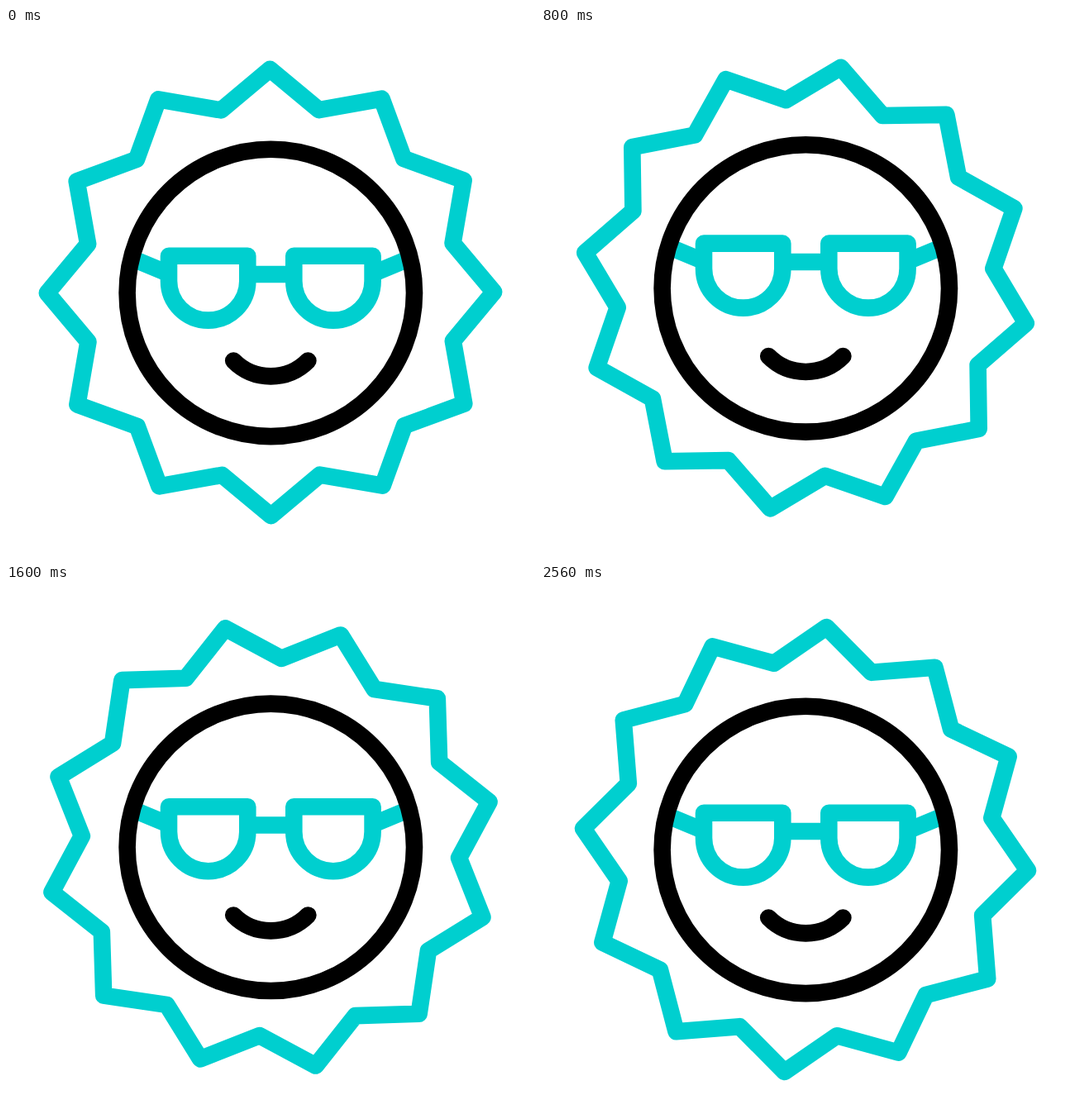
Write an HTML page that moves like this. It is 640x640 px and loops after 2.6 s.

```html
<!DOCTYPE html>
<html lang="en">
<head>
<meta charset="utf-8">
<title>Sun with sunglasses</title>
<style>
  html, body { margin: 0; width: 100%; height: 100%; overflow: hidden; background: #fff; }
  svg { display: block; width: 100%; height: 100%; }
  g { fill: none; stroke-width: 20.6; stroke-linejoin: round; }
  .teal { stroke: #00cfcf; }
  .black { stroke: #000; }
</style>
</head>
<body>
<svg viewBox="0 0 640 640">
  <g id="rays" class="teal"><polygon id="star"/></g>
  <g id="glasses" class="teal">
    <path d="M156 280.2L197 297.2M484.6 280.2L443.6 297.2M292.3 298H348.3"/>
    <path id="lens" d="M197 275.7H292.3V306a47.65 47.65 0 0 1 -95.3 0Z"/>
    <use href="#lens" x="151.3"/>
  </g>
  <g id="face" class="black">
    <circle cx="320.3" cy="320.4" r="173.7"/>
    <path d="M275.2 402.5a63.3 63.3 0 0 0 90.2 0" stroke-linecap="round"/>
  </g>
</svg>
<script>
const LOOP = 2600;
const LAG = 18; // the glasses trail the face slightly
// Damped bob: [time in ms, vertical offset]
const BOB = [[0, 0], [368, 20], [640, -17.4], [1000, 11], [1368, -9.7], [1740, 0]];

const el = id => document.getElementById(id);
const rays = el('rays'), glasses = el('glasses'), face = el('face');

const points = [];
for (let i = 0; i < 24; i++) {
  const a = i * Math.PI / 12;
  const r = i % 2 ? 228.5 : 270.2;
  points.push((r * Math.sin(a)).toFixed(2) + ',' + (-r * Math.cos(a)).toFixed(2));
}
el('star').setAttribute('points', points.join(' '));

const smooth = u => u * u * (3 - 2 * u);

function bob(t) {
  if (t <= 0) return 0;
  for (let i = 1; i < BOB.length; i++) {
    const [t0, y0] = BOB[i - 1], [t1, y1] = BOB[i];
    if (t < t1) return y0 + (y1 - y0) * smooth((t - t0) / (t1 - t0));
  }
  return 0;
}

function draw(t) {
  const y = bob(t);
  const turn = -360 * t / LOOP;
  rays.setAttribute('transform', `translate(320 ${320 + y}) rotate(${turn})`);
  face.setAttribute('transform', `translate(0 ${y})`);
  glasses.setAttribute('transform', `translate(0 ${2 * bob(t - LAG)})`);
}

const start = performance.now();
function tick() {
  draw((performance.now() - start) % LOOP);
  requestAnimationFrame(tick);
}
draw(0);
requestAnimationFrame(tick);
</script>
</body>
</html>
```
